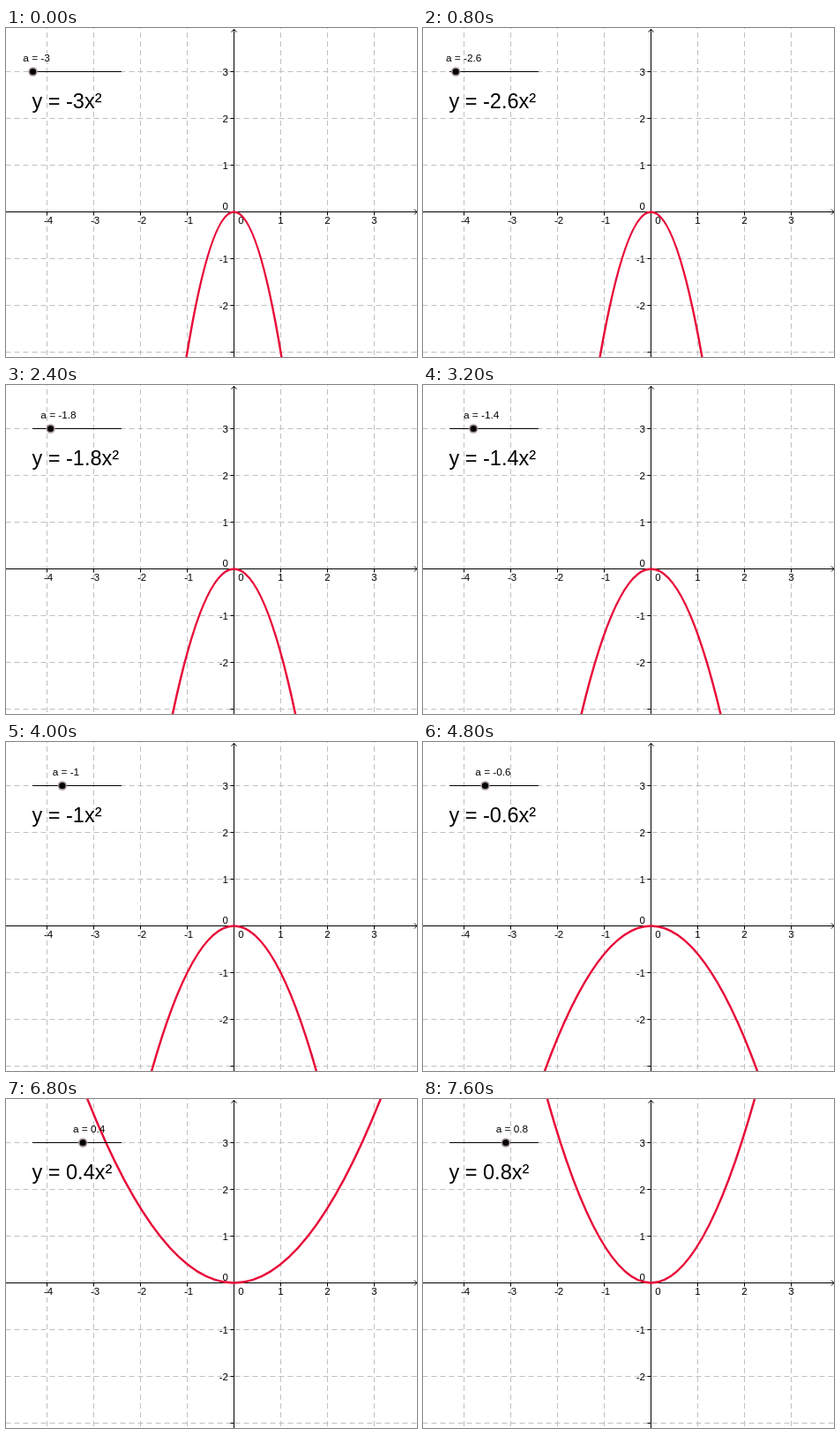
An HTML page for the animation above (8000 ms loop, 466 by 373 pixels).

```html
<!DOCTYPE html>
<html lang="en">
<head>
<meta charset="utf-8">
<title>Parabola y = ax²</title>
<style>
  html, body { margin: 0; width: 100%; height: 100%; overflow: hidden; background: #fff; }
  svg { display: block; width: 466px; height: 373px; }
  text { font: 11.5px "Liberation Sans", Arial, sans-serif; }
  #label { font-size: 11.8px; }
  #equation { font-size: 23.5px; }
  .mid { text-anchor: middle; }
  .end { text-anchor: end; }
  path { fill: none; stroke: #000; }
  .grid { stroke: #c0c0c0; stroke-dasharray: 6 4; stroke-dashoffset: .5; }
  #columns { stroke-dashoffset: 5; }
  #curve { stroke: #e80a38; stroke-width: 2.5; }
</style>
</head>
<body>
<svg viewBox="0 0 466 373">
  <path id="columns" class="grid"/>
  <path id="rows" class="grid"/>
  <path id="axes"/>
  <g id="numbers"></g>
  <path id="curve"/>
  <path d="M30 49.5H131"/>
  <g id="knob">
    <circle cy="49.5" r="5.2" fill="#a5959a"/>
    <circle cy="49.5" r="3.6" fill="#000"/>
    <text id="label" x="-11.2" y="38"></text>
  </g>
  <text id="equation" x="29.5" y="91"></text>
</svg>
<script>
const $ = id => document.getElementById(id);
const OX = 258.5, OY = 208.5, UNIT = 53;
const STEP = 400, STEPS = 20;

let columns = '', rows = '', numbers = '';
let axes = `M0 ${OY}H466M463 ${OY - 3}L466 ${OY}L463 ${OY + 3}` +
           `M${OX} 373V1M${OX - 3} 4.5L${OX} 1.5L${OX + 3} 4.5`;
const number = (x, y, n, cls) => {
  numbers += `<text class="${cls}" x="${x}" y="${y}">${n}</text>`;
};

for (let n = -4; n <= 3; n++) {
  const x = OX + n * UNIT, y = OY - n * UNIT;
  if (!n) continue;
  columns += `M${x} 0V373`;
  axes += `M${x} ${OY}v4`;
  number(x + (n < 0 ? 1.5 : 0), 222, n, 'mid');
  if (n < -3) continue;
  rows += `M0 ${y}H466`;
  axes += `M${OX} ${y}h-4`;
  if (n > -3) number(252, y + 4, n, 'end');
}
number(266.5, 222, 0, 'mid');
number(252, 206, 0, 'end');

$('columns').setAttribute('d', columns);
$('rows').setAttribute('d', rows);
$('axes').setAttribute('d', axes);
$('numbers').innerHTML = numbers;

function draw(now) {
  const k = Math.floor(now / STEP) % STEPS;
  const a = (k - 15) / 5;
  // One quadratic Bézier is an exact parabola; it ends just outside the stage.
  const reach = Math.min(5, Math.sqrt(4.2 / Math.abs(a)));
  const w = reach * UNIT, h = a * reach * w;
  $('curve').setAttribute('d', `M${OX - w} ${OY - h}Q${OX} ${OY + h} ${OX + w} ${OY - h}`);
  $('knob').setAttribute('transform', `translate(${30.5 + (a + 3) * 16.67} 0)`);
  $('label').textContent = `a = ${a}`;
  $('equation').textContent = `y = ${a}x²`;
}

let start;
function tick(now) {
  start ??= now;
  draw(now - start);
  requestAnimationFrame(tick);
}
draw(0);
requestAnimationFrame(tick);
</script>
</body>
</html>
```
